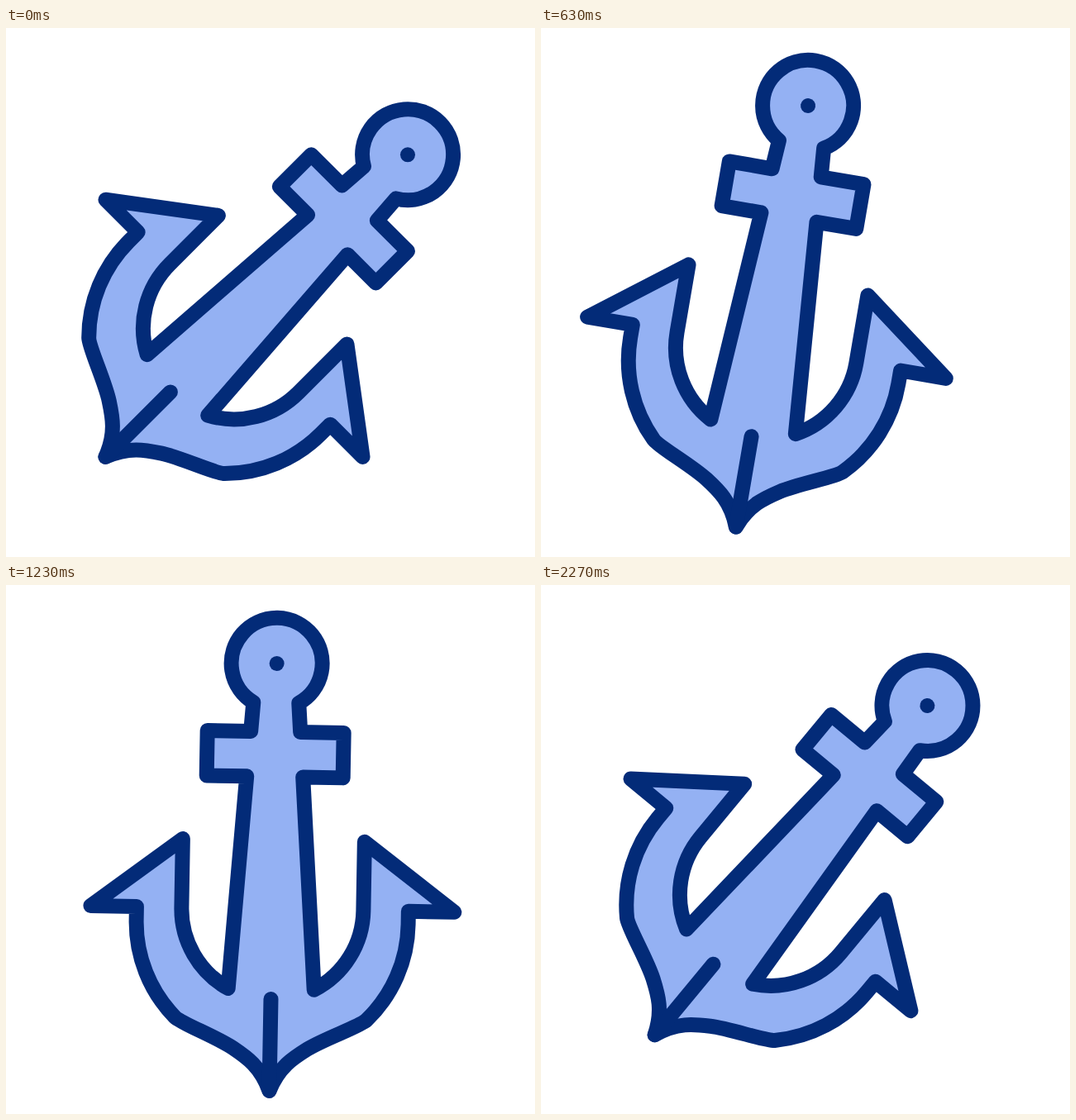
Recreate the animation shown at these times as an HTML page. Size 640 px wide and 640 px high, loop 2.3 s.

```html
<!DOCTYPE html>
<html lang="en">
<head>
<meta charset="utf-8">
<title>Swinging anchor</title>
<style>
  html, body { margin: 0; width: 100%; height: 100%; overflow: hidden; background: #fff; }
  svg { display: block; width: 100%; height: 100%; }
  .outline { fill: #94b1f3; stroke: #032b78; stroke-width: 18; stroke-linecap: round; stroke-linejoin: round; }
  .hole { fill: #032b78; }
</style>
</head>
<body>
<svg viewBox="0 0 640 640">
  <!-- The origin is the centre of the ring, which is also the pivot -->
  <g id="anchor">
    <path class="outline" d="M27.5 47.5 L30 82.5 H82.5 V137 H34 L52 394
      A110 110 0 0 0 110 297 V214 L220 297 H164.5 V313
      A164.5 164.5 0 0 1 116 429.6 C108 437.5 66 452.5 45 466 C28 477 11 488 0 517
      C-11 488 -28 477 -45 466 C-66 452.5 -108 437.5 -116 429.6 A164.5 164.5 0 0 1 -164.5 313
      V297 H-220 L-110 214 V297 A110 110 0 0 0 -52 394
      L-34 137 H-82.5 V82.5 H-30 L-27.5 47.5 A55 55 0 1 1 27.5 47.5 Z"/>
    <path class="outline" d="M0 517 V406"/>
    <circle class="hole" r="9"/>
  </g>
</svg>
<script>
  const LOOP = 2300;
  const STEPS = 69;
  const anchor = document.getElementById('anchor');

  const linear = u => u;
  const smooth = u => u * u * (3 - 2 * u);
  const easeOut = power => u => 1 - (1 - u) ** power;
  const mix = (a, b, q) => a + (b - a) * q;

  // Each pose eases on to the next one; "turn" overrides the easing of the angle
  const poses = [
    { at: 0, x: 486, y: 153.3, angle: 45, ease: easeOut(1.87), turn: easeOut(2.9) },
    { at: 16, x: 541, y: 87, angle: 60, ease: smooth },
    { at: 20, x: 282.7, y: 95.3, angle: 0.4, ease: smooth },
    { at: 26.3, x: 405.6, y: 101.7, angle: 8.7, ease: smooth },
    { at: 40, x: 316.7, y: 94, angle: -0.07, ease: smooth },
    { at: 48, x: 337, y: 95.5, angle: 2, ease: linear },
    { at: 61, x: 337, y: 95.5, angle: 2, ease: linear },
    { at: 69, x: 486, y: 153.3, angle: 45 }
  ];

  function draw(step) {
    const next = poses.findIndex(p => p.at > step);
    const a = poses[next - 1];
    const b = poses[next];
    const u = (step - a.at) / (b.at - a.at);
    const move = a.ease(u);
    const turn = (a.turn || a.ease)(u);
    const x = mix(a.x, b.x, move);
    const y = mix(a.y, b.y, move);
    const angle = mix(a.angle, b.angle, turn);
    anchor.setAttribute('transform', `translate(${x} ${y}) rotate(${angle})`);
  }

  const start = performance.now();

  function tick() {
    const time = (performance.now() - start) % LOOP;
    // Thirty steps a second, with a small lead for times rounded to 10 ms
    draw(Math.floor((time + 4) * STEPS / LOOP) % STEPS);
    requestAnimationFrame(tick);
  }

  tick();
</script>
</body>
</html>
```
